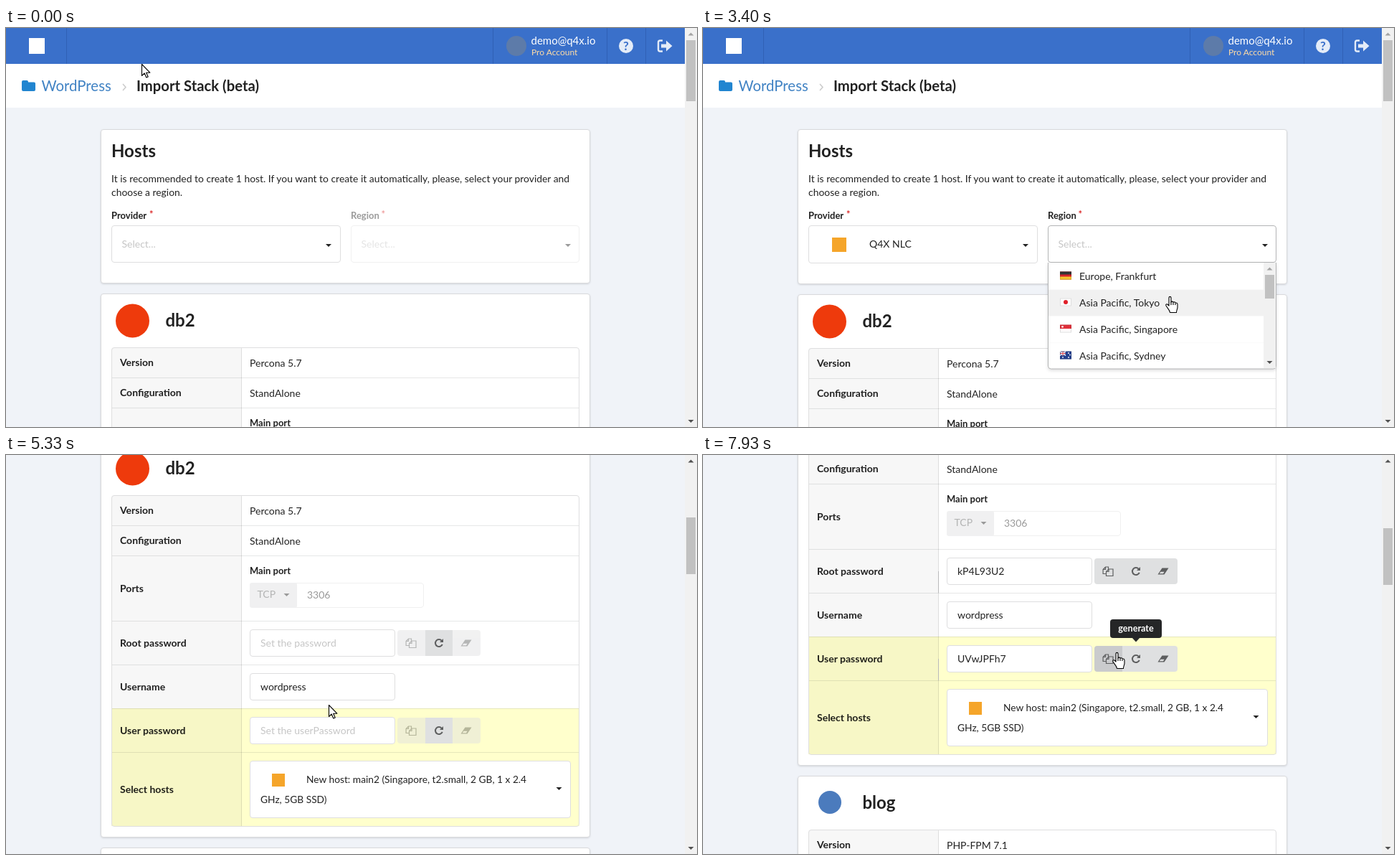
Animation of 964x556 px, one loop 8000 ms. Source, as an HTML page:

```html
<!DOCTYPE html>
<html lang="en">
<head>
<meta charset="utf-8">
<title>Import Stack</title>
<style>
html, body { margin: 0; width: 100%; height: 100%; overflow: hidden; background: #f0f3f8; }
svg { display: block; width: 100%; height: 100%; font-family: Lato, "Open Sans", sans-serif; font-size: 14px; }
text { white-space: pre; }
.card { fill: #fff; stroke: #d9dadc; filter: drop-shadow(0 1px 1px rgba(34,36,38,.15)); }
.menu { filter: drop-shadow(0 2px 2px rgba(34,36,38,.15)); }
</style>
</head>
<body>
<svg id="stage" viewBox="0 0 964 556" preserveAspectRatio="none"></svg>
<script>
const LOOP = 8000, FPS = 15;
const INK = 'rgba(0,0,0,.87)', LINE = '#dededf', DARK = '#b3b4b5', HINT = '#c6c6c6', GREY = '#dfe0e1';

function el(parent, tag, attrs = {}) {
  const node = document.createElementNS('http://www.w3.org/2000/svg', tag);
  for (const k in attrs) node.setAttribute(k, attrs[k]);
  parent.appendChild(node);
  return node;
}
const set = (node, k, v) => node.setAttribute(k, v);
const show = (node, on) => set(node, 'display', on ? 'inline' : 'none');
const move = (node, x, y) => set(node, 'transform', `translate(${x} ${y})`);
const group = (p, x = 0, y = 0) => el(p, 'g', { transform: `translate(${x} ${y})` });
const rect = (p, x, y, width, height, fill, more = {}) => el(p, 'rect', { x, y, width, height, fill, ...more });
const path = (p, d, fill, more = {}) => el(p, 'path', { d, fill, ...more });
const dot = (p, cx, cy, r, fill) => el(p, 'circle', { cx, cy, r, fill });
const frame = (p, x, y, w, h, fill = '#fff', stroke = LINE) =>
  rect(p, x + .5, y + .5, w - 1, h - 1, fill, { stroke, rx: 3.5 });
function text(p, x, y, str, more = {}) {
  const node = el(p, 'text', { x, y, fill: INK, ...more });
  node.textContent = str;
  return node;
}
const bold = (p, x, y, str, size = 14, more = {}) =>
  text(p, x, y, str, { 'font-weight': 700, 'font-size': size, ...more });
const caret = (p, x, y) => path(p, `M${x - 4} ${y - 2}h8l-4 4z`, '#222');
const square = (p, cx, cy, size, fill) => rect(p, cx - size / 2, cy - size / 2, size, size, fill);

const stage = document.getElementById('stage');
rect(stage, 0, 0, 964, 556, '#f0f3f8');
const page = group(stage);

// top bar and breadcrumb
rect(page, 0, 0, 947, 50, '#3a70ca');
rect(page, 0, 50, 947, 61, '#fff');
for (const x of [84, 679, 838, 892]) rect(page, x, 0, 1, 50, 'rgba(20,50,120,.25)');
square(page, 43, 25, 22, '#fff');
dot(page, 712, 25, 14, '#5d7ba9');
text(page, 732.5, 23, 'demo@q4x.io', { fill: '#fff', 'font-size': 15 });
text(page, 733, 38, 'Pro Account', { fill: '#ffdca6', 'font-size': 12 });
dot(page, 865, 25, 10, '#e4ecf8');
bold(page, 865, 31, '?', 17, { fill: '#3a70ca', 'text-anchor': 'middle' });
path(page, 'M916 17.5h-3.5a2.5 2.5 0 0 0-2.5 2.5v10a2.5 2.5 0 0 0 2.5 2.5h3.5', 'none',
  { stroke: '#e4ecf8', 'stroke-width': 2.4 });
path(page, 'M914 22.5h7v-5l8.5 7.5-8.5 7.5v-5h-7z', '#e4ecf8');
path(page, 'M22 75a2 2 0 0 1 2-2h5a2 2 0 0 1 2 2v.6h8a2 2 0 0 1 2 2V86a2 2 0 0 1-2 2H24a2 2 0 0 1-2-2z', '#2185d0');
text(page, 49.5, 88, 'WordPress', { fill: '#4183c4', 'font-size': 20.4 });
path(page, 'M163 78l4 4.5-4 4.5', 'none', { stroke: '#ccc', 'stroke-width': 1.6 });
bold(page, 182, 88, 'Import Stack (beta)', 20.3);

// hosts card
const hostCard = rect(page, 132.5, 141.5, 682, 214, '#fff', { class: 'card', rx: 3.5 });
bold(page, 147, 180, 'Hosts', 24);
const intro = { 'font-size': 13.9 };
text(page, 147, 215, 'It is recommended to create 1 host. If you want to create it automatically, please, select your provider and', intro);
text(page, 147, 234, 'choose a region.', intro);

function select(x, label, starX) {
  const g = group(page);
  bold(g, x, 266, label, 13);
  bold(g, starX, 264, '*', 13, { fill: '#db2828' });
  const box = frame(g, x, 275, x === 147 ? 320 : 319, 52);
  const hint = text(g, x + 14.5, 306, 'Select...', { fill: HINT });
  caret(g, x + 303, 303);
  return { g, x, box, hint };
}
const provider = select(147, 'Provider', 200);
const region = select(481, 'Region', 523.5);
const pickedName = text(provider.g, 176, 306, 'Q4X NLC');
const pickedLogo = square(provider.g, 190, 302, 20, '#f5a52a');

function flag(p, x, y, kind) {
  const g = group(p, x, y);
  const fill = { de: '#d8222a', jp: '#fdfdfd', sg: '#fdfdfd', au: '#24408e' }[kind];
  rect(g, 0, 0, 16, 11, fill);
  if (kind === 'de') { rect(g, 0, 0, 16, 4, '#333'); rect(g, 0, 7, 16, 4, '#f7c52c'); }
  if (kind === 'jp') dot(g, 8, 5.5, 3, '#e0202a');
  if (kind === 'sg') { rect(g, 0, 0, 16, 5.5, '#e0303a'); dot(g, 3.5, 2.8, 1.4, '#fff'); }
  if (kind === 'au') {
    path(g, 'M0 0l8 6M8 0l-8 6M4 0v6M0 3h8', 'none', { stroke: '#fff', 'stroke-width': 1.4 });
    path(g, 'M4 0v6M0 3h8', 'none', { stroke: '#d8222a', 'stroke-width': .8 });
    for (const [cx, cy] of [[4, 8.5], [12, 2.5], [12, 8.5], [14, 5]]) dot(g, cx, cy, .9, '#fff');
  }
  rect(g, .5, .5, 15, 10, 'none', { stroke: 'rgba(0,0,0,.12)' });
  return g;
}
const pickedRegion = group(region.g);
flag(pickedRegion, 496, 295, 'sg');
text(pickedRegion, 522, 306, 'Asia Pacific, Singapore');

const newHost = group(page);
bold(newHost, 147, 357, 'The following hosts will be created if they are selected:');
frame(newHost, 147, 375, 330, 70, '#f8f8f8', '#c9cacb');
for (let i = 0; i < 3; i++) {
  const y = 391 + i * 12.3;
  rect(newHost, 168, y, 42, 9.4, '#484848', { rx: 1 });
  rect(newHost, 171, y + 3.7, 20, 2, '#f8f8f8');
  dot(newHost, 205, y + 4.7, 1.9, '#f8f8f8');
}
bold(newHost, 235, 406, 'main2', 16);
text(newHost, 235, 424, 't2.small, 2 GB, 1 x 2.4 GHz, 5GB SSD', { 'font-size': 13.6 });

// service cards: origin is the top of the card
function service(title, height, rows) {
  const g = group(page);
  rect(g, 132.5, .5, 682, height - 1, '#fff', { class: 'card', rx: 3.5 });
  bold(g, 222.5, 46, title, 24);
  const table = group(g, 0, 75);
  const end = rows[rows.length - 1][0];
  rect(table, 147, 0, 182, end, '#f7f7f7', { rx: 4 });
  rows.slice(0, -1).forEach(([y, label, yellow], i) => {
    const h = rows[i + 1][0] - y;
    if (yellow) {
      rect(table, 329, y, 471, h, '#ffffcc');
      rect(table, 147, y, 182, h, '#f7f7c6');
    }
    if (i) rect(table, 147, y, 653, 1, 'rgba(34,36,38,.11)');
    bold(table, 159, y + h / 2 + 5.5 | 0, label);
  });
  rect(table, 328, 0, 1, end, 'rgba(34,36,38,.12)');
  frame(table, 147, 0, 653, end + 1, 'none');
  return { g, table };
}

const db = service('db2', 552, [[0, 'Version'], [42, 'Configuration'], [84, 'Ports'], [175, 'Root password'],
  [236, 'Username'], [297, 'User password', 1], [358, 'Select hosts', 1], [461]]);
dot(db.g, 176.5, 38, 23.5, '#ee3a0c');
text(db.table, 340, 27, 'Percona 5.7');
text(db.table, 340, 69, 'StandAlone');
bold(db.table, 340, 110, 'Main port', 13);
const port = el(db.table, 'g', { opacity: .45 });
frame(port, 400, 122, 183, 35);
rect(port, 340, 122, 66, 35, GREY, { rx: 3 });
text(port, 350.5, 143, 'TCP', { fill: 'rgba(0,0,0,.6)' });
caret(port, 391.5, 139);
text(port, 420, 144, '3306');
frame(db.table, 340, 248, 203, 38);
text(db.table, 355, 272, 'wordpress');
frame(db.table, 340, 370, 448, 80);
square(db.table, 380, 397, 18, '#f5a52a');
const chosen = { 'font-size': 13.75 };
text(db.table, 419, 401, 'New host: main2 (Singapore, t2.small, 2 GB, 1 x 2.4', chosen);
text(db.table, 355, 429, 'GHz, 5GB SSD)', chosen);
caret(db.table, 771.5, 409);

const ICONS = {
  copy: g => path(g, 'M-2.5 3.5H-6.9V-2.5L-3.5-6H.5V-3M-3.5-6V-2.5H-6.9M1-3H7V6.5H-2.5V.5ZM1-3V.5H-2.5', 'none',
    { stroke: '#5d5e5f', 'stroke-width': 1.2 }),
  redo: g => {
    path(g, 'M3.8-3.2A5 5 0 1 0 4.7 1.8', 'none', { stroke: '#5d5e5f', 'stroke-width': 2 });
    path(g, 'M6-6V-1H1Z', '#5d5e5f');
  },
  wipe: g => {
    path(g, 'M-1.5-4.5H7.5L1.5 4.5H-7.5Z', '#5d5e5f');
    path(g, 'M-3.6.8H1.6L0 3.3H-5.3Z', GREY);
  }
};
const BUTTONS = [
  ['copy', 546, 39, 'M39 0H4a4 4 0 0 0-4 4v28a4 4 0 0 0 4 4h35z'],
  ['redo', 585, 38, 'M0 0h38v36H0z'],
  ['wipe', 623, 39, 'M0 0h35a4 4 0 0 1 4 4v28a4 4 0 0 1-4 4H0z']
];
function secret(y, hintText, value) {
  const p = db.table;
  frame(p, 340, y + 12, 203, 38);
  const hint = text(p, 355, y + 36, hintText, { fill: HINT });
  const word = text(p, 355, y + 36, value);
  const edge = rect(p, 328, y + 31, 1, 30, '#b9babb');
  const buttons = BUTTONS.map(([kind, x, w, d]) => {
    const g = group(p, x, y + 13);
    const back = path(g, d, GREY);
    ICONS[kind](group(g, 19, 18));
    return { g, back, x, w, y: y + 13, kind };
  });
  return { y, hint, word, edge, buttons };
}
const secrets = [secret(175, 'Set the password', 'kP4L93U2'), secret(297, 'Set the userPassword', 'UVwJPFh7')];
for (const s of secrets) {
  s.tip = group(db.table, 568, s.y - 24);
  path(s.tip, 'M30 25h12l-6 6.5z', '#252627');
  rect(s.tip, 0, 0, 72, 26, '#252627', { rx: 4 });
  bold(s.tip, 36, 17, 'generate', 12.6, { fill: '#fff', 'text-anchor': 'middle' });
}

const blog = service('blog', 600, [[0, 'Version'], [42, 'Configuration'], [84, 'Ports'], [175]]);
dot(blog.g, 177, 37, 16, '#4b7bbd');
text(blog.table, 340, 27, 'PHP-FPM 7.1');
text(blog.table, 340, 69, 'StandAlone');

// dropdown lists: origin is the lower left corner of the select
function menu(x, w, pitch, rows, thumbH, tint) {
  const g = el(page, 'g', { class: 'menu' });
  const edge = path(g, `M.5 0V144a4 4 0 0 0 4 4H${w - 4.5}a4 4 0 0 0 4-4V0`, '#fff', { stroke: DARK });
  const items = rows.map(([label, draw], i) => {
    const y = i * pitch;
    const back = rect(g, 1, y, w - 18, Math.min(pitch, 147 - y), `rgba(0,0,0,${tint})`);
    if (i) rect(g, 1, y, w - 18, 1, '#fafafa');
    draw(g, y + pitch / 2);
    return { back, label: text(g, x === 147 ? 87 : 44, y + pitch / 2 + 5, label) };
  });
  rect(g, w - 18, 0, 17, 147, '#f1f1f1');
  rect(g, w - 16, 17, 13, thumbH, '#c1c1c1');
  path(g, `M${w - 13.5} 10.5h8l-4-4z`, '#a3a3a3');
  path(g, `M${w - 13.5} 137h8l-4 4z`, '#505050');
  return { g, edge, x, w, pitch, items };
}
const providers = menu(147, 320, 50.8, [
  ['Q4X NLC', (g, y) => square(g, 44, y, 20, '#f5a52a')],
  ['Q4X LV', (g, y) => dot(g, 44, y, 12, '#1a80e6')],
  ['My Kelth', (g, y) => square(g, 45, y, 16, '#5c6c7e')]
], 88, .03);
const withFlag = kind => (g, y) => flag(g, 17, y - 6, kind);
const regions = menu(481, 319, 37, [
  ['Europe, Frankfurt', withFlag('de')],
  ['Asia Pacific, Tokyo', withFlag('jp')],
  ['Asia Pacific, Singapore', withFlag('sg')],
  ['Asia Pacific, Sydney', withFlag('au')]
], 33, .055);

// page scrollbar
rect(stage, 947, 0, 17, 556, '#f1f1f1');
const thumb = rect(stage, 949, 17, 13, 85, '#c1c1c1');
const upArrow = path(stage, 'M951.5 10.5h8l-4-4z', '#a3a3a3');
path(stage, 'M951.5 546h8l-4 4z', '#505050');

// pointers, drawn around their hot spot
const pointer = group(stage);
const inked = { stroke: '#000', 'stroke-width': 1.1, 'stroke-linejoin': 'round' };
const shapes = { arrow: group(pointer), hand: group(pointer), beam: group(pointer) };
path(shapes.arrow, 'M.5.5V16.5L4.2 13 6.8 19 9.2 18 6.7 12.2H11.8Z', '#fff', inked);
path(shapes.hand, 'M-2 2C-2-.2 1-.2 1 2V8C1.5 6.6 4 6.9 4 8.5 5 7.3 7 7.8 7 9.3 8.5 8.6 10 9.3 10 11V15C10 18 8.5 19 8.5 22.5H-.5C-1 19-3.5 17-6 13-7 11-5 10-3.5 11.5L-2 13Z', '#fff', inked);
path(shapes.hand, 'M1 8v4M4 9v3M7 10v2', 'none', inked);
path(shapes.beam, 'M-3-7.5H-1Q.5-7.5.5-6 .5-7.5 2-7.5H4M.5-6.5V6.5M-3 7.5H-1Q.5 7.5.5 6 .5 7.5 2 7.5H4', 'none', { stroke: '#000' });

const PATH = [
  [0, 189, 50], [70, 189, 50], [470, 338, 298], [930, 338, 298], [1200, 353, 345], [1470, 353, 345],
  [1870, 620, 303], [2270, 620, 303], [2670, 652, 374], [3400, 652, 374], [3530, 650, 416],
  [3800, 650, 416], [4130, 418, 407], [4800, 418, 407], [4930, 415, 368], [5200, 415, 368],
  [5670, 600, 262], [6000, 602, 266], [6480, 602, 266], [6730, 546, 294], [6950, 546, 294],
  [7360, 603, 282], [7640, 603, 282], [7880, 578, 275], [LOOP, 578, 275]
];
const SCROLL = [
  [0, 0], [4130, 0], [4200, 45], [4270, 97], [4330, 125], [4400, 180], [4470, 200], [4540, 200], [4600, 230],
  [4670, 285], [4730, 300], [4810, 300], [4870, 308], [4930, 330], [5000, 375], [5070, 398], [5130, 402],
  [5200, 435], [5270, 482], [5330, 500], [6770, 500], [6870, 535], [6930, 580], [7000, 600], [LOOP, 600]
];
const ramp = (t, a, b) => Math.min(1, Math.max(0, (t - a) / (b - a)));
const smooth = u => u * u * (3 - 2 * u);
function at(keys, t, ease) {
  const i = keys.findIndex(k => k[0] > t);
  const a = keys[i - 1], b = keys[i], u = ease(ramp(t, a[0], b[0]));
  return a.slice(1).map((v, n) => v + (b[n + 1] - v) * u);
}
const inside = (x, y, l, t, w, h) => x >= l && x < l + w && y >= t && y < t + h;

const PICK = 1456, ADD = 3790;

function drawMenu(m, size, open, x, y) {
  show(m.g, size > .01);
  set(m.g, 'transform', `translate(${m.x} 327) scale(1 ${size})`);
  set(m.g, 'opacity', size);
  set(m.edge, 'stroke', open ? DARK : LINE);
  const over = size > .5 && inside(x, y, m.x, 327, m.w, 148);
  const row = over ? Math.floor((y - 327) / size / m.pitch) : 0;
  m.items.forEach((item, i) => show(item.back, i === row));
  return over;
}

function draw(t) {
  const scroll = Math.round(at(SCROLL, t, u => u)[0]);
  const [x, y] = at(PATH, t, smooth).map(Math.round);
  const docY = y + scroll;
  const grow = t < PICK ? 0 : t < ADD ? 1 : 111;
  let hand = false;

  move(page, 0, -scroll);
  set(hostCard, 'height', 214 + grow);
  move(db.g, 0, 370 + grow);
  move(blog.g, 0, 936 + grow);

  const size1 = ramp(t, 720, 920) * (1 - ramp(t, PICK, PICK + 220));
  const size2 = ramp(t, 2060, 2260) * (1 - ramp(t, 3660, 3860));
  const open = [t > 720 && t < PICK, t > 2060 && t < 3660];
  hand = drawMenu(providers, size1, open[0], x, docY) || hand;
  hand = drawMenu(regions, size2, open[1], x, docY) || hand;
  set(providers.items[0].label, 'font-weight', t < PICK ? 400 : 700);

  [provider, region].forEach((s, i) => {
    const over = inside(x, docY, s.x, 275, 319, 52);
    hand = hand || over;
    set(s.box, 'stroke', over || open[i] ? DARK : LINE);
  });
  const loaded = t > 1640;
  show(provider.hint, t < PICK);
  show(pickedName, t >= PICK);
  show(pickedLogo, loaded);
  set(pickedName, 'x', loaded ? 232 : 176);
  set(provider.box, 'height', loaded ? 52 : 51);
  set(region.g, 'opacity', t < PICK ? .45 : 1);
  show(region.hint, t < 3660);
  show(pickedRegion, t >= 3660);
  show(newHost, t >= ADD);

  const tips = [ramp(t, 5730, 5830) * (1 - ramp(t, 7230, 7330)), ramp(t, 7440, 7540)];
  secrets.forEach((s, i) => {
    const filled = t >= [5960, 7600][i];
    show(s.hint, !filled);
    show(s.word, filled);
    show(s.edge, filled);
    set(s.tip, 'opacity', tips[i]);
    for (const b of s.buttons) {
      const on = filled || b.kind === 'redo';
      const over = on && inside(x, docY, b.x, 445 + grow + b.y, b.w, 36);
      hand = hand || over;
      set(b.g, 'opacity', on ? 1 : .45);
      set(b.back, 'fill', over ? '#cacbcd' : GREY);
    }
  });

  set(thumb, 'y', Math.floor(17 + scroll * .1417));
  set(thumb, 'height', t < ADD ? 85 : 79);
  set(upArrow, 'fill', scroll ? '#505050' : '#a3a3a3');

  const kind = t > 4080 && t < 4860 ? 'beam' : hand ? 'hand' : 'arrow';
  for (const k in shapes) show(shapes[k], k === kind);
  move(pointer, x, y);
}

function toStep(t) {
  const n = Math.floor((t + 4) * FPS / 1000);
  return Math.min(LOOP - 10, Math.round(n * 100 / FPS) * 10);
}
const start = performance.now();
function tick() {
  draw(toStep((performance.now() - start) % LOOP));
  requestAnimationFrame(tick);
}
tick();
</script>
</body>
</html>
```
